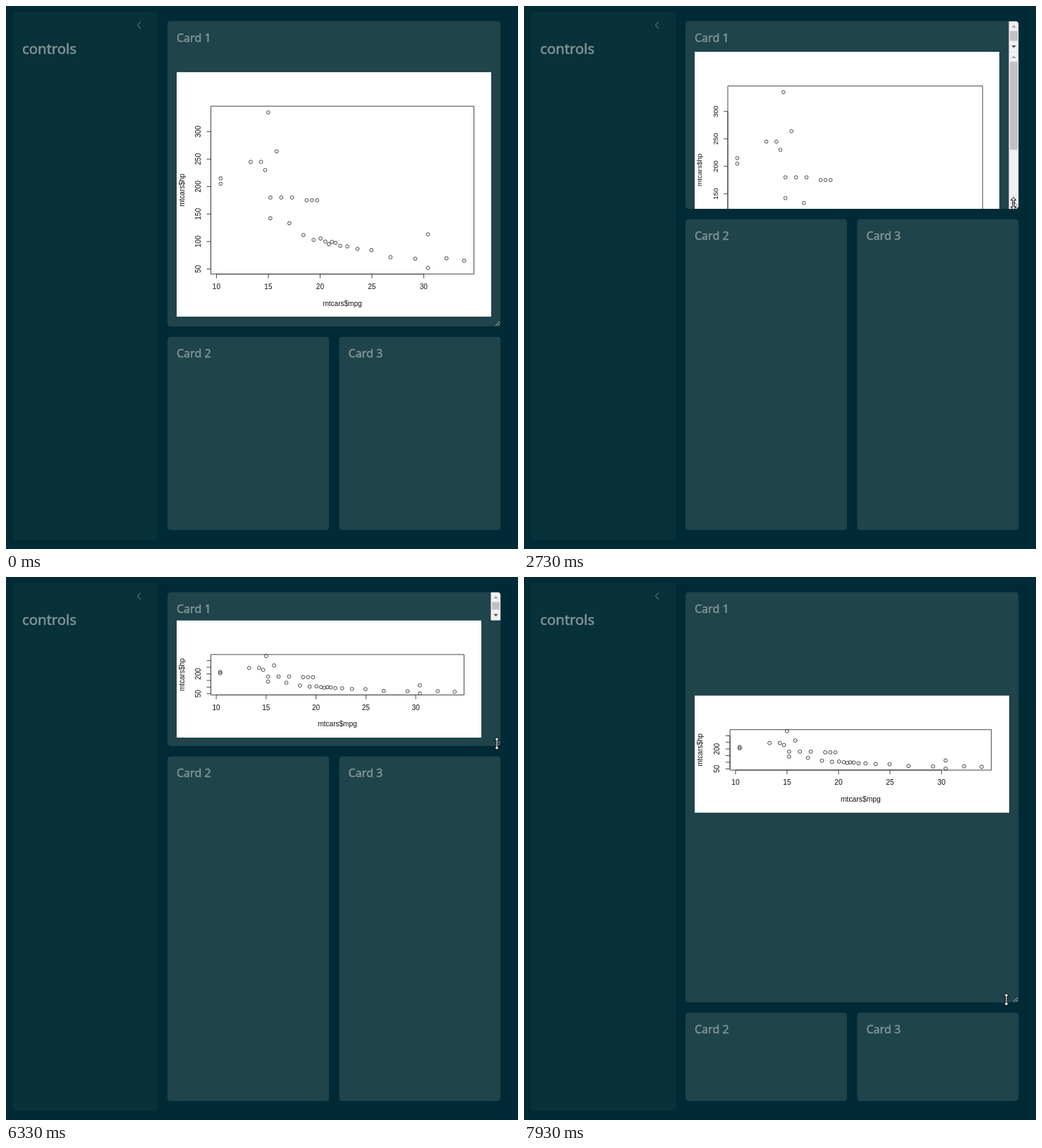
An HTML page for the animation above (8 s loop, 726 by 771 pixels).

```html
<!DOCTYPE html>
<html lang="en">
<head>
<meta charset="utf-8">
<title>Resizable cards</title>
<style>
  html, body { margin: 0; width: 100%; height: 100%; overflow: hidden; background: #002b36; }
  #stage { display: block; width: 726px; height: 771px; }
  .card { fill: #1f444b; }
  .title { font: 16px "Noto Sans", "Open Sans", sans-serif; fill: #839496; stroke: #839496; stroke-width: .45; }
  .title.big { font-size: 20.3px; stroke-width: .55; }
  .plot text { font: 10px "Liberation Sans", Arial, sans-serif; text-anchor: middle; fill: #111; }
  .plot .ink { fill: none; stroke: #333; stroke-width: .9; }
  .grip { stroke: #b4c0c2; fill: none; }
  #cursor path { fill: #fff; stroke: #000; }
</style>
</head>
<body>
<svg id="stage" viewBox="0 0 726 771">
  <defs><clipPath id="clip"><rect id="clipBox" x="229" y="21.5" width="472.3" rx="4.5"/></clipPath></defs>
  <rect x="10" y="8" width="205" height="750" rx="4.5" fill="#08313a"/>
  <path d="M191 22.5 L186.3 27.2 L191 32" fill="none" stroke="#839496"/>
  <text class="title big" x="23" y="68">controls</text>

  <rect id="top" class="card" x="229" y="21.5" width="472.3" rx="4.5"/>
  <text class="title" x="242" y="51">Card 1</text>
  <g clip-path="url(#clip)">
    <g id="plots"></g>
    <g id="headBar"></g>
    <g id="bodyBar"></g>
    <path id="grip" class="grip" d="M-7 -1 L-1 -7 M-3.5 -1 L-1 -3.5"/>
  </g>

  <rect class="card low" x="229" width="229" rx="4.5"/>
  <rect class="card low" x="472.5" width="228.8" rx="4.5"/>
  <text class="title low" x="242">Card 2</text>
  <text class="title low" x="485.5">Card 3</text>

  <g id="cursor">
    <path id="arrow" d="M.5 .5 V16 L4 12.8 L6.3 18.3 L8.6 17.3 L6.3 11.9 H11.3Z"/>
    <path id="sizer" d="M0 -9 L3.8 -4.8 H1.1 V4.8 H3.8 L0 9 L-3.8 4.8 H-1.1 V-4.8 H-3.8Z"/>
  </g>
</svg>
<script>
const $ = id => document.getElementById(id);
const set = (el, attrs) => { for (const k in attrs) el.setAttribute(k, attrs[k]); };
const show = (el, on) => el.setAttribute("visibility", on ? "visible" : "hidden");

const LOOP = 8000, STEP = 1000 / 15;
const TALL = 347.6, SHORT = 166.6;

// Scatter: a few outliers, two even rows, and a decaying trend with seeded spread
function scatter() {
  let seed = 7;
  const random = () => (seed = seed * 16807 % 2147483647) / 2147483647;
  const points = [[10.4, 205], [10.4, 215], [13.3, 245], [14.3, 245], [14.7, 230],
    [15, 335], [15.8, 264], [30.4, 52], [30.4, 113], [33.9, 65]];
  for (let i = 0; i < 3; i++) points.push([15.2 + i * 1.05, 180], [18.7 + i * .5, 175]);
  for (let i = 0; i < 16; i++) {
    const s = i / 7.5 - 1;
    const mpg = 21.3 + 2.5 * s + 2.4 * s ** 2 + 6 * s ** 3;
    points.push([mpg, 60 + 92 * Math.exp((15 - mpg) / 6.5) + (random() - .5) * 14]);
  }
  return points;
}
const points = scatter();

// Linear scale over the data range widened by 4% at each end
function scale(data, from, to) {
  const lo = Math.min(...data), hi = Math.max(...data), pad = (hi - lo) * .04;
  return v => from + (to - from) * (v - lo + pad) / (hi - lo + 2 * pad);
}

function plot(w, h, labelStep) {
  const l = 48.5, t = 48.5, r = w - 24.5, b = h - 60.7;
  const x = scale(points.map(p => p[0]), l, r), y = scale(points.map(p => p[1]), b, t);
  const upright = (px, py, s) => `<text transform="translate(${px} ${py}) rotate(-90)">${s}</text>`;
  let lines = `M${l} ${t}H${r}V${b}H${l}Z M${l} ${y(50)}V${y(300)} M${x(10)} ${b}H${x(30)}`;
  let text = "";
  for (let v = 10; v <= 30; v += 5) {
    lines += `M${x(v)} ${b}v6`;
    text += `<text x="${x(v)}" y="${b + 21.3}">${v}</text>`;
  }
  for (let v = 50; v <= 300; v += 50) {
    lines += `M${l} ${y(v)}h-6`;
    if ((v - 50) % labelStep === 0) text += upright(l - 14.5, y(v), v);
  }
  text += `<text x="${(l + r) / 2}" y="${b + 45}">mtcars$mpg</text>` + upright(l - 38, (t + b) / 2, "mtcars$hp");
  const dots = points.map(p => `<circle cx="${x(p[0])}" cy="${y(p[1])}" r="2.4"/>`).join("");
  return `<svg class="plot" x="242" height="${h}" viewBox="0 0 ${w} ${h}" preserveAspectRatio="none">
    <rect width="${w}" height="${h}" fill="#fff"/><g class="ink"><path d="${lines}"/>${dots}</g>${text}</svg>`;
}

$("plots").innerHTML = plot(446, TALL, 50) + plot(432, SHORT, 150);
const [tall, short] = $("plots").children;

function drawBar(bar, on, y1, y2, ratio) {
  show(bar, on);
  if (!on) return;
  bar.innerHTML = `<rect x="687.5" y="${y1}" width="14" height="${y2 - y1}" fill="#f1f1f1"/>
    <rect x="689" y="${y1 + 14}" width="11" height="${(y2 - y1 - 28) * ratio}" fill="#c1c1c1"/>
    <path d="M691.2 ${y1 + 9}h6.6l-3.3 -3.5z" fill="#a3a3a3"/>
    <path d="M691.2 ${y2 - 9}h6.6l-3.3 3.5z" fill="#505050"/>`;
}

// Smooth step by delta, from start over span ms
function move(t, start, span, delta) {
  const p = Math.min(1, Math.max(0, (t - start) / span));
  return delta * p * p * (3 - 2 * p);
}

// Bottom edge of the top card: two drags up, three down
const edgeAt = t => 455 + move(t, 1700, 1450, -209) + move(t, 3266, 333, -6)
  + move(t, 6333, 817, 315) + move(t, 7133, 333, 37) + move(t, 7600, 333, 12);

function drawCursor(t) {
  const within = (a, b) => t >= a && t < b;
  const leaving = within(3800, 3933), entering = within(4533, 4600);
  const arrow = within(800, 1200) || leaving || entering;
  const seen = t >= 800 && !within(3933, 4533);

  // The edge trails the pointer slightly
  let x = 714 + move(t, 800, 400, -21) + move(t, 2600, 1000, 20) + move(t, 6333, 1067, -12);
  let y = edgeAt(t + 20) - 4 + move(t, 800, 400, -40) + 40;
  if (leaving) { x -= 7; y += 12; }
  if (entering) y -= 11;
  if (t >= 4600) x -= 17;

  set($("cursor"), { transform: `translate(${Math.round(x * 2) / 2} ${Math.round(y * 2) / 2})` });
  show($("arrow"), seen && arrow);
  show($("sizer"), seen && !arrow);
}

function draw(time) {
  const t = Math.floor((time + 5) / STEP) * STEP + .5;
  const bottom = Math.round(edgeAt(t));

  // The image is centred until the shrinking header has to scroll
  const centred = (bottom - 267.5) / 2, squeezed = 62 + (bottom - 246) * .0727;
  const top = Math.max(centred, squeezed);
  const redrawn = t >= 4066, height = redrawn ? SHORT : TALL;
  const headScroll = squeezed > centred, bodyScroll = top + height > bottom;

  set($("top"), { height: bottom - 21.5 });
  set($("clipBox"), { height: bottom - 21.5 });
  for (const el of document.querySelectorAll(".low")) {
    const y = bottom + 14.7;
    set(el, el.tagName === "rect" ? { y, height: 744 - y } : { y: Math.round(y + 29.3) });
  }
  show(tall, !redrawn);
  show(short, redrawn);
  set(redrawn ? short : tall, { y: top, width: headScroll || bodyScroll ? 432 : 446 });
  drawBar($("headBar"), headScroll, 21.5, top, .9);
  drawBar($("bodyBar"), bodyScroll, top, bottom, (bottom - top) / height);
  set($("grip"), { transform: `translate(701 ${bottom})` });
  $("grip").style.stroke = bodyScroll ? "#777" : "";
  drawCursor(t);
}

const start = performance.now();
function tick() {
  draw((performance.now() - start) % LOOP);
  requestAnimationFrame(tick);
}
tick();
</script>
</body>
</html>
```
